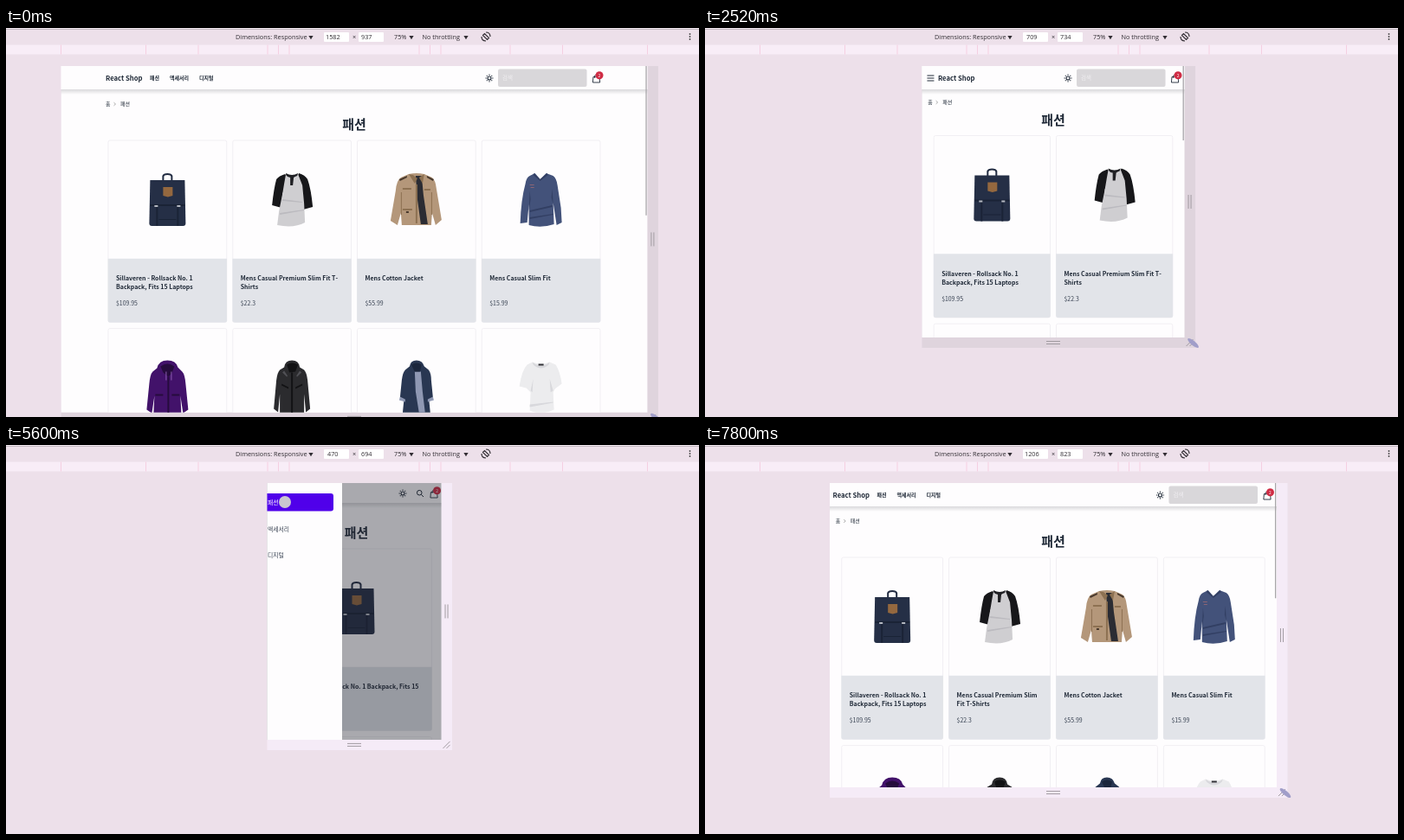
An HTML page with a canvas that plays this animation: 800x450 px, repeating every 7.84 s.

```html
<!DOCTYPE html>
<html lang="ko">
<head>
<meta charset="utf-8">
<style>
  html, body { margin: 0; width: 100%; height: 100%; overflow: hidden; background: #ede0ea; }
  canvas { display: block; }
</style>
</head>
<body>
<canvas id="stage" width="800" height="450"></canvas>
<script>
const g = document.getElementById('stage').getContext('2d');
const LOOP = 7840, STEP = 40, SCALE = 0.4278, CX = 402, TOP = 44;
const PAGE = '"Noto Sans CJK KR", "Noto Sans CJK JP", "Noto Sans CJK", sans-serif';
const TOOL = '"Open Sans", "Noto Sans", sans-serif';
const INK = '#1f2937', TOOL_INK = '#302c32';

// Rows of [time, value, value...], joined by straight segments
const sizes = [[0, 1582, 937], [520, 1582, 937], [960, 1345, 864], [1320, 1155, 816], [1720, 969, 781],
  [2120, 865, 762], [2920, 552, 706], [3400, 507, 698], [3960, 470, 694], [6920, 470, 694],
  [7720, 1169, 820], [7800, 1206, 823]];
const pointer = [[3960, 512, 347], [4480, 547, 347], [4720, 540, 335], [5300, 322, 66], [5800, 322, 66],
  [6200, 440, 190], [6460, 445, 200], [6680, 507.5, 265], [6840, 537, 352], [6920, 512, 347]];
const OPEN = 5420, CLOSE = 6440;

const products = [
  { title: 'Sillaveren - Rollsack No. 1 Backpack, Fits 15 Laptops', price: '$109.95', art: [
    ['#222c42', 'M-6 9V3Q-5 0 0 0Q5 0 6 3V9H4V4Q4 2 0 2Q-4 2-4 4V9Z'],
    ['#252f46', 'M-20 8H20L21 58Q21 61 18 61H-18Q-21 61-21 58Z'],
    ['#1a2336', 'M-20 36H20V38H-20ZM-13 38H-11V61H-13ZM11 38H13V61H11ZM-10 53H10V54H-10Z'],
    ['#94683f', 'M-5 16H6V26L.5 27.5L-5 26Z'],
    ['#b5b9c2', 'M-15 37H-11V39H-15ZM11 37H15V39H11Z']] },
  { title: 'Mens Casual Premium Slim Fit T-Shirts', price: '$22.3', art: [
    ['#17171a', 'M-8 1Q-15 3-18 7Q-21 18-23 37L-12 40L-11 24L-4 6ZM8 0Q15 2 18 7Q22 18 24 39L13 42L12 24L5 5Z'],
    ['#cfced1', 'M-7 1Q0 4 7 1L12 14L14 35L15 57Q2 64-17 60L-15 44L-11 24L-9 12Z'],
    ['#bbbabf', 'M-11 30L12 33V34L-11 32ZM-14 46L14 42V43L-14 48Z'],
    ['#202024', 'M-7 0Q0 4 7 0L6 3Q3 4 2 5L1 14H-2L-2 5Q-5 5-7 2Z']] },
  { title: 'Mens Cotton Jacket', price: '$55.99', art: [
    ['#b4977a', 'M-9 1Q0-1 9 1L18 5Q22 8 23 18L29 54L22 60L18 46L17 60H-17L-18 46L-22 60L-30 55L-24 20Q-23 8-18 5Z'],
    ['#2b2c33', 'M-1 3H6L8 25L13 59H5L1 30Z'],
    ['#8d7152', 'M-9 1L-2 12L1 6L-4 2ZM9 1L7 12L3 5ZM-16 17H-6V19H-16ZM-16 41H-5V43H-16ZM9 18H16V20H9ZM-1 13H1V58H-1ZM-18 22H-17V48H-18ZM17 22H18V48H17Z'],
    ['#49392d', 'M-20 7L-11 3V5L-19 9ZM12 3L20 7L19 9L12 5ZM-12 44H-9V46H-12Z']] },
  { title: 'Mens Casual Slim Fit', price: '$15.99', art: [
    ['#43527a', 'M-7 0L-1 7L6 0L14 3Q18 6 19 14L23 40L24 57L18 60L14 34L15 59Q0 64-14 60L-14 36L-16 57L-24 58Q-23 30-18 12Q-17 5-13 3Z'],
    ['#323f63', 'M-8 0L-1 7L7 0L8 2L-1 9L-9 2ZM-14 44L-13 20L-12 30ZM14 36L13 18L12 28ZM-13 43L13 37V39L-13 45ZM-13 51L14 47V48L-13 53Z'],
    ['#8d6574', 'M-13 13H-8V14H-13ZM-12 16H-8V17H-12Z']] },
  { art: [
    ['#42126a', 'M-12 8Q-10-1 0-1Q10-1 12 7L17 12Q20 15 21 26L24 56L18 60L15 40L16 60H-16L-15 40L-18 60L-24 56L-21 26Q-20 15-17 12Z'],
    ['#260c3d', 'M-8 6Q0 0 8 6L5 14L1 18L-5 13ZM0 18H2V60H0ZM-14 38H-5V40H-14ZM5 38H14V40H5Z'],
    ['#8b5bb0', 'M-2 12H-1V22H-2ZM4 12H5V22H4Z']] },
  { art: [
    ['#2b2b2e', 'M-9 7Q-8-1 0-1Q8-1 9 7L14 10Q17 13 18 22L21 55L16 59L14 38L14 60H-14L-14 38L-16 59L-21 55L-18 22Q-17 13-14 10Z'],
    ['#121214', 'M-6 4Q0 0 7 4L4 12L-3 13ZM-1 13H1V60H-1ZM-12 26L-4 30V32L-12 28ZM12 26L4 30V32L12 28Z'],
    ['#505055', 'M-9 11L-5 17L-6 18L-11 13ZM9 11L5 17L6 18L11 13Z']] },
  { art: [
    ['#293752', 'M-8 6Q-7-1 0-1Q7-1 9 6L14 10Q17 14 17 22L19 42L13 45L13 30L16 60H-16L-13 30L-13 45L-19 42L-17 22Q-16 13-13 10Z'],
    ['#8f98b3', 'M-2 12H5L7 35L10 60H3L-1 35ZM-19 41L-13 44V47L-20 45ZM13 44L19 41L20 45L13 47Z'],
    ['#1b263c', 'M-6 4Q0 0 6 4L4 12H-2Z']] },
  { art: [
    ['#ececee', 'M-10 1Q0 5 10 1L17 4Q22 12 24 26L16 32L14 36L15 56Q0 63-13 57L-12 36L-17 31L-25 29Q-22 10-16 4Z'],
    ['#d8d8dc', 'M-10 1Q0 9 10 1L9 4Q0 12-9 4ZM-13 50L14 47V48L-13 53ZM-12 34L-9 20L-10 36ZM14 34L10 20L11 36Z'],
    ['#333338', 'M-3 3H3V5H-3Z']] }
];
for (const p of products) p.art = p.art.map(([color, d]) => [color, new Path2D(d)]);

const clamp = v => Math.max(0, Math.min(1, v));
const easeOut = v => 1 - (1 - v) ** 2;

function sample(rows, t) {
  const i = rows.findIndex(r => r[0] > t);
  if (i < 0) return rows[rows.length - 1].slice(1);
  if (i === 0) return rows[0].slice(1);
  const a = rows[i - 1], b = rows[i], k = (t - a[0]) / (b[0] - a[0]);
  return a.slice(1).map((v, j) => v + (b[j + 1] - v) * k);
}

function rect(x, y, w, h, color, radius = 0) {
  g.fillStyle = color;
  g.beginPath();
  g.roundRect(x, y, w, h, radius);
  g.fill();
}

function text(s, x, y, size, { color = INK, weight = 400, align = 'left', family = PAGE } = {}) {
  g.font = `${weight} ${size}px ${family}`;
  g.fillStyle = color;
  g.textAlign = align;
  g.fillText(s, x, y + size * 0.36);
}

function stroke(d, x, y, color = '#333', width = 0.9) {
  g.save();
  g.translate(x, y);
  g.strokeStyle = color;
  g.lineWidth = width;
  g.stroke(new Path2D(d));
  g.restore();
}

function dot(x, y, r, color) {
  g.fillStyle = color;
  g.beginPath();
  g.arc(x, y, r, 0, 7);
  g.fill();
}

function wrap(s, width) {
  const lines = [''];
  for (const word of s.match(/[^\s-]*-?\s?/g)) {
    const last = lines.length - 1;
    if (g.measureText((lines[last] + word).trim()).width > width) lines.push(word);
    else lines[last] += word;
  }
  return lines;
}

function toolbar(w, h) {
  rect(0, 0, 800, 1, '#f3e9f1');
  rect(0, 1, 800, 1, '#c3b8c1');
  rect(0, 19.5, 800, 11, '#f8edf7');
  for (const d of [75, 87.5, 100, 180, 240.5, 338.5])
    for (const side of [-1, 1]) rect(401.5 + side * d, 19.5, 1, 11, '#f5cfe1');
  const label = (s, x) => text(s, x, 10.5, 7.3, { color: TOOL_INK, family: TOOL });
  const arrow = x => {
    g.fillStyle = TOOL_INK;
    g.fill(new Path2D(`M${x - 2.6} 9H${x + 2.6}L${x} 13.2Z`));
  };
  rect(367, 5, 29, 11, '#fff', 1);
  rect(407, 5, 29, 11, '#fff', 1);
  label('Dimensions: Responsive', 265); arrow(352);
  label(Math.round(w), w < 1000 ? 371 : 369);
  label('×', 400);
  label(Math.round(h), 410);
  label('75%', 448); arrow(468);
  label('No throttling', 480.5); arrow(531);
  stroke('M-3.5-1.5L-1.5-3.5L3.5 1.5L1.5 3.5ZM-5 0Q-5 5 0 5M0-5Q5-5 5 0', 554, 10, TOOL_INK, 1.2);
  for (const y of [7, 10, 13]) dot(789.5, y, 0.9, '#444');
}

function card(p, x, y, w, priceY, height) {
  rect(x, y, w, height, '#fefdfe', 2);
  g.strokeStyle = '#f1eff3';
  g.lineWidth = 1;
  g.stroke();
  rect(x - 0.3, y + 136.7, w + 0.6, height - 136.7, '#e2e4e9', [0, 0, 2, 2]);
  g.save();
  g.translate(x + w / 2, y + 38);
  for (const [color, path] of p.art) {
    g.fillStyle = color;
    g.fill(path);
  }
  g.restore();
  if (!p.title) return;
  g.font = `700 7px ${PAGE}`;
  wrap(p.title, w - 18).forEach((line, i) => text(line, x + 9, y + 159.6 + i * 10.3, 7, { weight: 700 }));
  text(p.price, x + 9, y + priceY, 6.9, { color: '#374151' });
}

function header(w, half, cx, compact) {
  const left = cx - half, right = cx + half, y = compact ? 56 : 58;
  const bottom = compact ? 67 : 71;
  const shade = g.createLinearGradient(0, bottom, 0, bottom + 6);
  shade.addColorStop(0, 'rgba(40,40,50,.17)');
  shade.addColorStop(1, 'rgba(40,40,50,0)');
  rect(0, bottom, 800, 6, shade);
  rect(0, TOP, 800, bottom - TOP, '#fefdfe');
  if (w < 768) {
    stroke('M0-3H8M0 0H8M0 3H8', left + 2.5, y, INK, 1);
    text('React Shop', left + 15, y, 7.7, { weight: 700 });
  } else {
    text('React Shop', left, y, 7.7, { weight: 700 });
    [['패션', 51], ['액세서리', 74], ['디지털', 108]].forEach(([s, dx]) => text(s, left + dx, y, 6, { weight: 700 }));
  }
  const sun = right - (compact ? 43.5 : 131);
  stroke('M2 0A2 2 0 1 1-2 0A2 2 0 1 1 2 0M0-4.5V-3.2M0 4.5V3.2M-4.5 0H-3.2M4.5 0H3.2M-3.2-3.2L-2.4-2.4M3.2 3.2L2.4 2.4M-3.2 3.2L-2.4 2.4M3.2-3.2L2.4-2.4', sun, y, INK, 1.1);
  if (compact) stroke('M2-.8A2.8 2.8 0 1 1-3.6-.8A2.8 2.8 0 1 1 2-.8M1.4 1.4L4 4', right - 23.5, y, INK, 1);
  else {
    rect(right - 121, 47.5, 102.5, 20.5, '#d9d7da', 2);
    text('검색', right - 116, y, 6.5, { color: '#f0eef1' });
  }
  stroke('M-3.6-2.2H3.6L4.1 4.2H-4.1ZM-2-1V-3.6Q0-6 2-3.6V-1', right - 7.5, y + 0.8, INK);
  dot(right - 4, y - 3.2, 4.5, '#cf2c45');
  text('2', right - 4, y - 3.2, 5, { color: '#fff', align: 'center' });
}

function shop(w, h, cx) {
  const dev = w * SCALE / 2, compact = w < 480, carousel = !compact && w < 640;
  const cols = w >= 1024 ? 4 : w >= 640 ? 2 : 1;
  const [crumbY, headY, gridY] = cols === 4 ? [88, 112, 130] : compact ? [81.5, 102, 120] : [86, 107, 124.5];
  const half = w >= 1536 ? 284 : Math.min(267, dev - 13.7);
  const crumbX = cx - half - (w >= 1280 ? 3 : 7);
  text('홈', crumbX, crumbY, 6);
  stroke('M-1-1.8L1 0L-1 1.8', crumbX + 10.5, crumbY, '#888', 0.7);
  text('패션', crumbX + 17, crumbY, 6);
  text('패션', cx, headY, 15, { weight: 700, align: 'center' });

  g.save();
  g.beginPath();
  g.rect(cx - half - 1, 0, half * 2 + 2, 450);
  g.clip();
  const gap = 7, cardW = carousel ? 136.7 : (half * 2 - gap * (cols - 1)) / cols;
  products.forEach((p, i) => {
    const col = carousel ? i : i % cols, row = carousel ? 0 : Math.floor(i / cols);
    const y = gridY + row * 217.6;
    if (y < TOP + h * SCALE)
      card(p, cx - half + col * (cardW + gap), y, cardW, carousel ? 199.5 : 188.7, carousel ? 222 : 210.5);
  });
  g.restore();
  header(w, Math.min(287, dev - 3.5), cx, compact);
  return carousel ? 478 : { 4: 930, 2: 1145, 1: 2321 }[cols];
}

function drawer(t, left) {
  const slide = easeOut(clamp((t - OPEN) / 300)) - easeOut(clamp((t - CLOSE) / 300));
  const dim = clamp((t - OPEN) / 190) - clamp((t - CLOSE) / 270);
  if (dim > 0) rect(0, 0, 800, 450, `rgba(30,33,42,${0.4 * dim})`);
  if (slide <= 0) return;
  const x = left - 103 * (1 - slide);
  rect(x, TOP, 103, 400, '#fefdfe');
  rect(x + 10, 56, 83, 20.5, '#5000ea', 3);
  ['패션', '액세서리', '디지털'].forEach((s, i) =>
    text(s, x + 17, 66.3 + i * 30.8, 6.8, { color: i ? '#374151' : '#fff' }));
}

function frame(left, right, bottom, held) {
  const strip = held ? '#dfd4dd' : '#f5ebf7', midY = (TOP + bottom) / 2, grey = '#a09aa0';
  rect(left, TOP, right - left + 12.5, bottom - TOP + 12, strip);
  stroke('M-1.5-8V8M1.5-8V8', right + 6, midY, grey, 1);
  stroke('M-8-1.5H8M-8 1.5H8', CX, bottom + 6, grey, 1);
  stroke('M-4 4L4-4M0 4L4 0', right + 6, bottom + 6, grey, 1);
}

function cursor(t, right, bottom) {
  const dragging = t < 3960 || t >= 6920;
  const [x, y] = dragging ? [right + 10, bottom + 6.5] : sample(pointer, t);
  const onEdge = dragging || Math.abs(x - right - 6) < 7;
  if (!onEdge) return dot(x, y, 7, '#c9c6d0');
  g.fillStyle = '#a19ec9';
  g.beginPath();
  g.ellipse(x, y, 8, 2.6, y > bottom ? 0.7 : 0, 0, 7);
  g.fill();
}

function draw(t) {
  const [w, h] = sample(sizes, t);
  const left = CX - w * SCALE / 2, right = CX + w * SCALE / 2, bottom = TOP + h * SCALE;
  const menuOpen = t >= OPEN && t < CLOSE;
  rect(0, 0, 800, 450, '#ede0ea');
  toolbar(w, h);
  frame(left, right, bottom, t < 3960);

  g.save();
  g.beginPath();
  g.rect(left, TOP, right - left, bottom - TOP);
  g.clip();
  rect(0, 0, 800, 450, '#fefdfe');
  const content = shop(w, h, CX + (menuOpen ? 2.5 : 0));
  if (!menuOpen) rect(right - 2, TOP, 1.3, (bottom - TOP) ** 2 / content, '#a8a5a9');
  drawer(t, left);
  g.restore();
  cursor(t, right, bottom);
}

function tick() {
  draw(Math.floor(performance.now() % LOOP / STEP) * STEP);
  requestAnimationFrame(tick);
}
tick();
</script>
</body>
</html>
```
